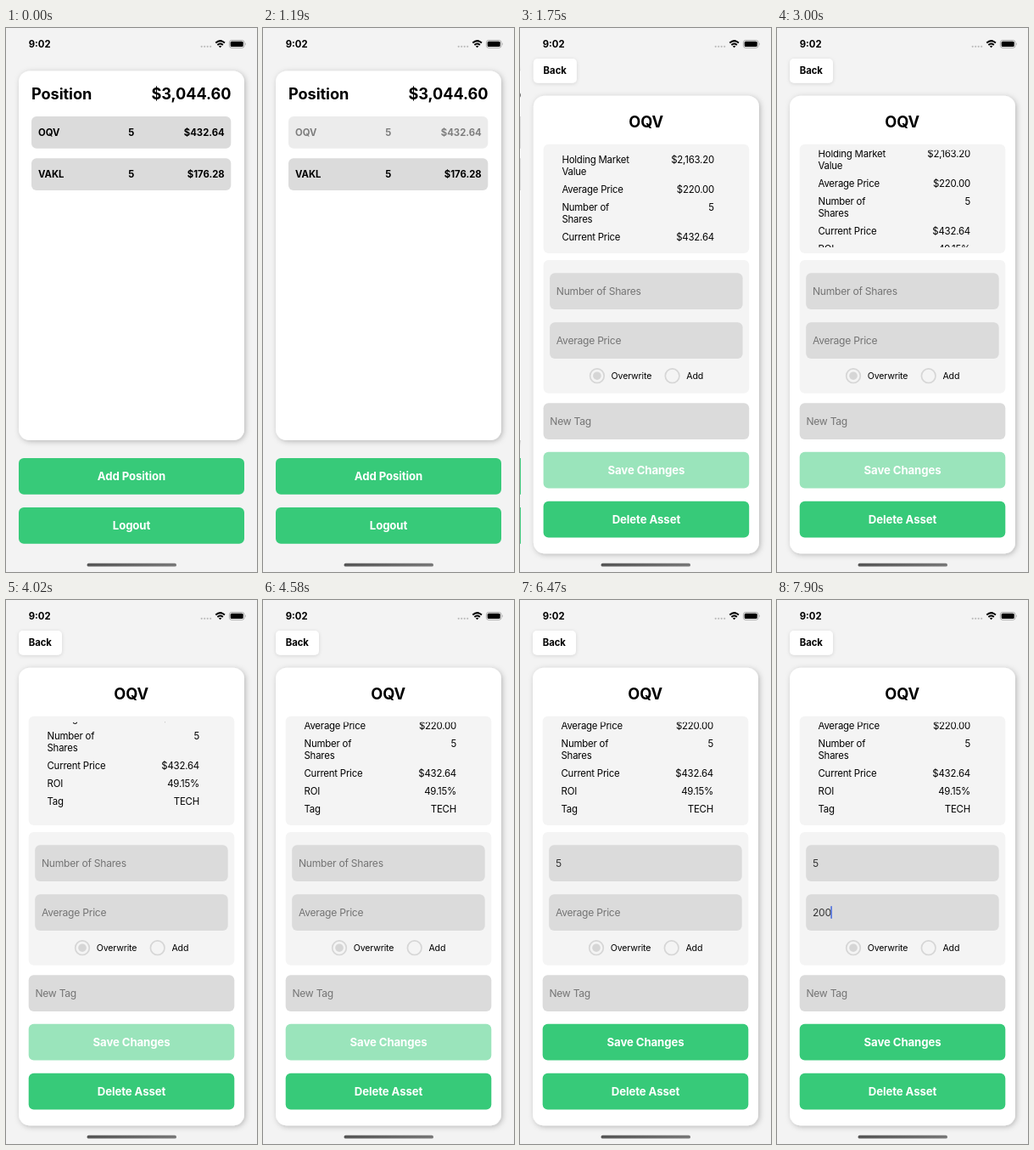
Recreate the animation shown at these times as an HTML page. Size 296 px wide and 640 px high, loop 8000 ms.

```html
<!DOCTYPE html>
<html lang="en">
<head>
<meta charset="utf-8">
<title>Portfolio app</title>
<style>
  html, body { margin: 0; width: 100%; height: 100%; overflow: hidden; background: #f3f3f3; }
  svg { display: block; width: 100%; height: 100%; }
  text { font-family: Inter, "Open Sans", sans-serif; fill: #000; white-space: pre; }
  .head { font-size: 18.2px; font-weight: 700; letter-spacing: -.1px; }
  .button { font-size: 13.2px; font-weight: 700; letter-spacing: -.1px; fill: #fff; }
  .strong { font-size: 11.3px; font-weight: 700; }
  .body { font-size: 11.4px; letter-spacing: -.2px; }
  .small { font-size: 10.6px; letter-spacing: -.15px; }
  .input { font-size: 12.1px; letter-spacing: -.25px; fill: #333; }
  .hint { fill: #747474; }
</style>
</head>
<body>
<svg id="stage" viewBox="0 0 296 640"></svg>
<script>
const LOOP = 8000, WIDTH = 296, GREEN = '#37ca79', GRAY = '#dbdbdb', PAGE = '#f3f3f3';

const TICKS = [0, 1190, 1300, 1420, 1540, 1640, 1750, 3000, 3110, 3220, 3330,
  4020, 4130, 4240, 4360, 4470, 4580, 5230, 5840, 5960, 6060, 6350, 6470,
  6710, 6820, 7340, 7450, 7560, 7750, 7900];

const rect = (x, y, w, h, r, fill, extra = '') =>
  `<rect x="${x}" y="${y}" width="${w}" height="${h}" rx="${r}" fill="${fill}" ${extra}/>`;
const text = (x, y, str, cls, anchor = 'start', id = '') =>
  `<text x="${x}" y="${y}" class="${cls}" text-anchor="${anchor}" ${id && `id="${id}"`}>${str}</text>`;
const card = (y, h) => rect(15, y, 266, h, 13, '#fff', 'filter="url(#cardShadow)"');
const button = (x, y, w, label, id = '') =>
  `<g ${id && `id="${id}"`}>${rect(x, y, w, 42.7, 6, GREEN)}${text(148, y + 26, label, 'button', 'middle')}</g>`;
const field = (x, y, w, label, id = '') =>
  rect(x, y, w, 42.7, 6, GRAY) + text(x + 7.7, y + 25.6, label, 'input hint', 'start', id);
const holding = (y, symbol, price, id = '') =>
  `<g ${id && `id="${id}"`}>${rect(30, y, 235.3, 37.7, 6, GRAY)}` +
  text(38, y + 23, symbol, 'strong') + text(147.7, y + 23, '5', 'strong', 'middle') +
  text(257.7, y + 23, price, 'strong', 'end') + '</g>';
const detail = ([y, label, value]) =>
  label.split('|').map((line, i) => text(48.5, y + i * 14, line, 'body')).join('') +
  text(228, y, value, 'body', 'end');
const radio = (x, label) =>
  `<circle cx="${x}" cy="409.2" r="8.3" fill="none" stroke="#d6d6d6" stroke-width="1.7"/>` +
  text(x + 16.7, 413, label, 'small');

const details = [
  [159, 'Holding Market|Value', '$2,163.20'],
  [194, 'Average Price', '$220.00'],
  [215, 'Number of|Shares', '5'],
  [250, 'Current Price', '$432.64'],
  [271, 'ROI', '49.15%'],
  [292, 'Tag', 'TECH']
];

const listScreen = rect(0, 0, WIDTH, 640, 0, PAGE) + card(50.5, 434.5) +
  text(30, 84, 'Position', 'head') + text(265.3, 84, '$3,044.60', 'head', 'end') +
  holding(104, 'OQV', '$432.64', 'pressed') + holding(153.3, 'VAKL', '$176.28') +
  button(15, 506, 266, 'Add Position') + button(15, 564, 266, 'Logout');

const assetScreen = rect(0, 0, WIDTH, 640, 0, PAGE) +
  rect(15, 36, 51, 28.7, 5, '#fff', 'filter="url(#chipShadow)"') +
  text(26.7, 54.2, 'Back', 'strong') + card(79.7, 538.5) +
  text(147.7, 116.7, 'OQV', 'head', 'middle') +
  rect(26.7, 136.8, 242.6, 128.2, 6, '#f4f4f4') +
  `<g clip-path="url(#viewport)"><g id="details">${details.map(detail).join('')}</g></g>` +
  rect(26.7, 273, 242.6, 156.7, 6, '#f4f4f4') +
  field(34.2, 288.3, 227.5, 'Number of Shares', 'shares') +
  field(34.2, 346.2, 227.5, 'Average Price', 'price') +
  rect(0, 0, 1.5, 15, .7, '#4468dd', 'id="caret"') +
  radio(90, 'Overwrite') + '<circle cx="90" cy="409.2" r="4.8" fill="#d6d6d6"/>' +
  radio(178.7, 'Add') + field(26.7, 441.2, 242.6, 'New Tag') +
  button(26.7, 498.8, 242.6, 'Save Changes', 'save') +
  button(26.7, 556.8, 242.6, 'Delete Asset');

const statusBar = text(26.7, 23, '9:02', 'strong') +
  [230.7, 234.2, 237.7, 241.2].map(x => `<circle cx="${x}" cy="21.8" r="1.1" fill="#bcbcbc"/>`).join('') +
  `<g fill="none" stroke="#000" stroke-width="2">
    <path d="M247.3 17.6Q252.6 12.6 257.9 17.6"/><path d="M249.4 20Q252.6 17 255.8 20"/></g>
  <path d="M250.9 21.5Q252.6 20 254.3 21.5L252.6 23.3Z"/>
  <rect x="263.4" y="14.5" width="17.6" height="8.8" rx="2.6" fill="none" stroke="#999" stroke-width=".8"/>` +
  rect(264.7, 15.8, 15, 6.2, 1.5, '#000') +
  '<path d="M282 17.3q1.4 1.6 0 3.2z" fill="#999"/>' +
  rect(95.5, 629.8, 105.5, 3.8, 1.9, 'url(#homeBar)');

document.getElementById('stage').innerHTML = `<defs>
  <filter id="cardShadow" x="-10%" y="-10%" width="120%" height="120%">
    <feDropShadow dx="1.5" dy="1.5" stdDeviation="3" flood-opacity=".25"/></filter>
  <filter id="chipShadow" x="-30%" y="-40%" width="160%" height="180%">
    <feDropShadow dx="0" dy="1" stdDeviation="2" flood-opacity=".13"/></filter>
  <linearGradient id="homeBar"><stop stop-color="#555"/><stop offset="1" stop-color="#777"/></linearGradient>
  <clipPath id="viewport"><rect x="34" y="143.7" width="228" height="114.2"/></clipPath>
  </defs><g id="list">${listScreen}</g><g id="asset">${assetScreen}</g>${statusBar}`;

const el = Object.fromEntries([...document.querySelectorAll('[id]')].map(node => [node.id, node]));
const clamp = v => Math.min(1, Math.max(0, v));
const ramp = (t, from, to) => clamp((t - from) / (to - from));

// Remaining distance of a critically damped spring
function spring(t, start, rate) {
  const x = Math.max(0, t - start) / 1000 * rate;
  return (1 + x) * Math.exp(-x);
}

function scrollAt(t) {
  if (t < 3000) return 0;
  if (t < 3960) return 53 - 46 * (1 - ramp(t, 3000, 3330)) ** 2;
  return 42 + (t < 4580 ? 10.5 * spring(t, 3960, 10) : 0);
}

function caretAlpha(t) {
  if (t < 5230 || t >= 7340 && t < 7450) return 0;
  if (t < 5960) return 1 - .5 * ramp(t, 5780, 5840);
  if (t < 6600) return 1 - ramp(t, 6290, 6410);
  return ramp(t, 6650, 6770);
}

function setInput(node, hint, value) {
  node.textContent = value || hint;
  node.classList.toggle('hint', !value);
}

function render(time) {
  const t = TICKS.findLast(tick => tick <= time);

  const rest = t < 3000 ? spring(t, 1275, 16.8) : 0;
  el.list.setAttribute('transform', `translate(${-.3 * WIDTH * (1 - rest)})`);
  el.asset.setAttribute('transform', `translate(${WIDTH * rest})`);
  el.asset.setAttribute('visibility', rest < 1 ? 'visible' : 'hidden');
  el.pressed.setAttribute('opacity', t < 1190 ? 1 : .5 + .5 * ramp(t, 1190, 1420));
  el.details.setAttribute('transform', `translate(0 ${-scrollAt(t)})`);

  const shares = t < 5960 ? '' : '5';
  const price = '200'.slice(0, [7560, 7750, 7900].filter(key => t >= key).length);
  setInput(el.shares, 'Number of Shares', shares);
  setInput(el.price, 'Average Price', price);

  const second = t >= 7340;
  el.caret.setAttribute('x', 41.6 + 7.25 * (second ? price : shares).length);
  el.caret.setAttribute('y', second ? 360 : 302.2);
  el.caret.setAttribute('opacity', caretAlpha(t));
  el.save.setAttribute('opacity', .5 + .5 * ramp(t, 5930, 6060));
}

const start = performance.now();
function loop() {
  render((performance.now() - start) % LOOP);
  requestAnimationFrame(loop);
}
loop();
</script>
</body>
</html>
```
